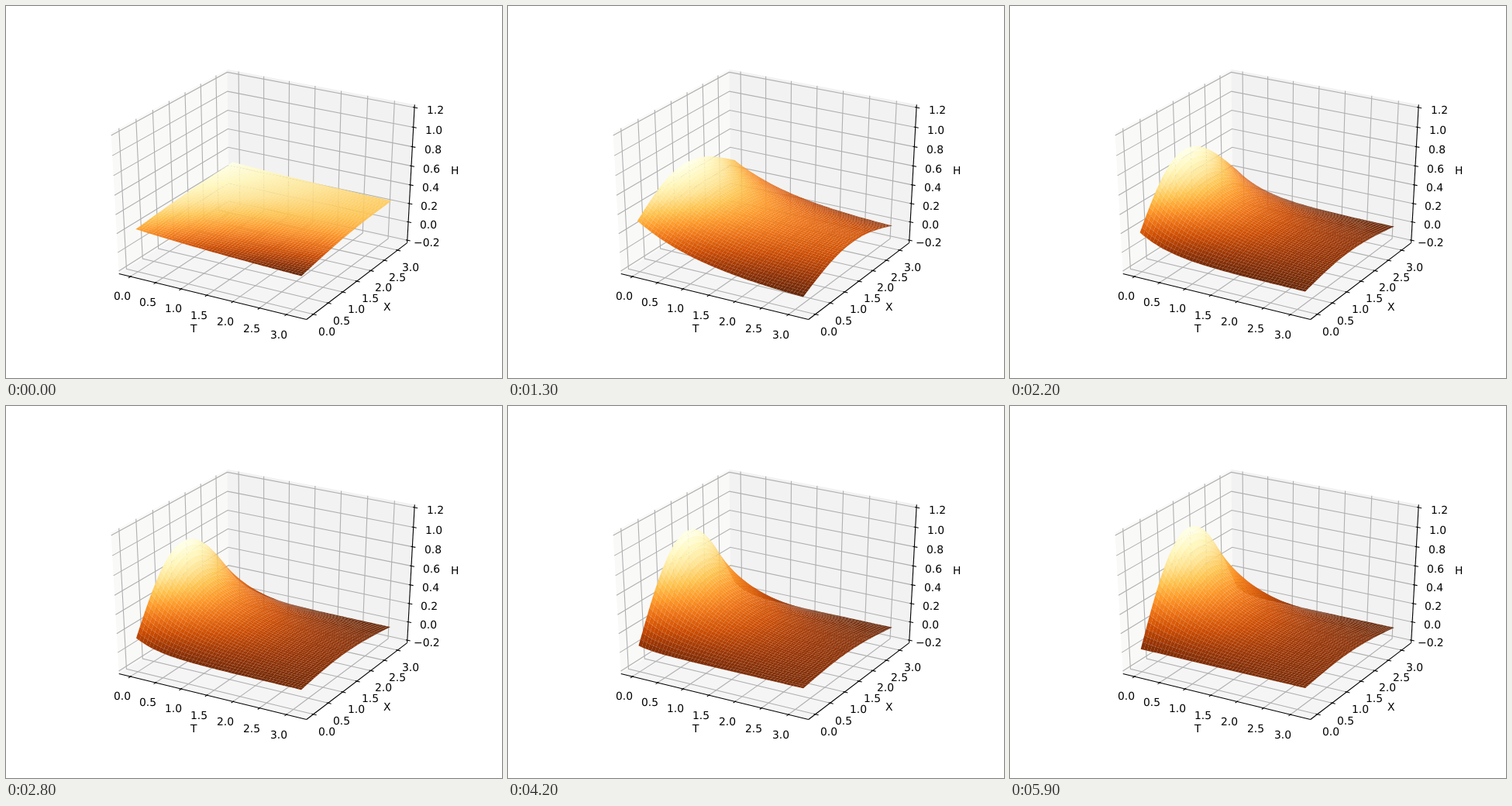
An HTML page with a canvas for the animation above (6 s loop, 640 by 480 pixels).

```html
<!DOCTYPE html>
<html lang="en">
<head>
<meta charset="utf-8">
<title>Surface plot</title>
<style>
html, body { margin: 0; width: 100%; height: 100%; overflow: hidden; background: #fff; }
canvas { display: block; width: 640px; height: 480px; }
</style>
</head>
<body>
<canvas id="stage" width="640" height="480"></canvas>
<script>
const stage = document.getElementById('stage');
const CELLS = 50, LOOP = 6000, STEP = 100, WARMUP = 0.8;
const EDGE = 0.5 + 1 / 48;        // panes reach a little past the axis limits
const TICK_PAD = 0.0738, NAME_PAD = 0.1605;
const RAMP = ['662506', '993404', 'cc4c02', 'ec7014', 'fe9929', 'fec44f', 'fee391', 'fff7bc', 'ffffe5']
  .map(hex => [0, 2, 4].map(i => parseInt(hex.slice(i, i + 2), 16)));

const { PI, exp, sin, min, max, floor, round } = Math;
const lerp = (a, b, k) => a + (b - a) * k;
const spanAxis = v => (v + 0.05 * PI) / (1.1 * PI) - 0.5;
const heightAxis = h => (h + 0.2) / 1.4 - 0.5;

// Perspective view from azimuth -60, elevation 30, distance 10.
function project([x, y, z]) {
  const s = Math.sqrt(3) / 2;
  const depth = 10 - (s / 2 * x - 0.75 * y + z / 2);
  return [334.7 + 2681.1 * (s * x + y / 2) / depth,
          237.4 - 1997.8 * (-x / 4 + s / 2 * y + s * z) / depth];
}

function trace(ctx, points) {
  ctx.beginPath();
  points.forEach(p => ctx.lineTo(...project(p)));
}

function line(ctx, color, ...points) {
  trace(ctx, points);
  ctx.strokeStyle = color;
  ctx.stroke();
}

function fill(ctx, color, ...points) {
  trace(ctx, points);
  ctx.closePath();
  ctx.fillStyle = color;
  ctx.fill();
}

function label(ctx, text, point, drop) {
  const [x, y] = project(point);
  const left = round(x - ctx.measureText(text).width / 2);
  ctx.fillStyle = '#000';
  ctx.fillText(text, left, round(y + drop));
}

function drawAxes(ctx) {
  const E = EDGE, out = E + 1 / 60, inn = E - 1 / 120;
  const far = E + TICK_PAD, name = E + NAME_PAD;
  const grey = '#b0b0b0', black = '#000';
  const spanTicks = Array.from({ length: 7 }, (_, i) => i / 2);
  const heightTicks = Array.from({ length: 8 }, (_, i) => (i - 1) / 5);
  const format = v => v.toFixed(1).replace('-', '\u2212');

  ctx.fillStyle = '#fff';
  ctx.fillRect(0, 0, 640, 480);
  ctx.lineWidth = 1.11;
  ctx.font = '13.89px "DejaVu Sans", sans-serif';
  ctx.textRendering = 'geometricPrecision';

  fill(ctx, '#f9f9f8', [-E, -E, -E], [-E, E, -E], [-E, E, E], [-E, -E, E]);
  fill(ctx, '#f2f2f2', [-E, E, -E], [E, E, -E], [E, E, E], [-E, E, E]);
  fill(ctx, '#f5f5f5', [-E, -E, -E], [E, -E, -E], [E, E, -E], [-E, E, -E]);

  for (const v of spanTicks) {
    const p = spanAxis(v);
    line(ctx, grey, [p, -E, -E], [p, E, -E], [p, E, E]);
    line(ctx, grey, [E, p, -E], [-E, p, -E], [-E, p, E]);
  }
  for (const v of heightTicks) {
    const p = heightAxis(v);
    line(ctx, grey, [E, E, p], [-E, E, p], [-E, -E, p]);
  }

  line(ctx, black, [-E, -E, -E], [E, -E, -E]);
  line(ctx, black, [E, -E, -E], [E, E, -E]);
  line(ctx, black, [E, E, -E], [E, E, E]);

  for (const v of spanTicks) {
    const p = spanAxis(v);
    line(ctx, black, [p, -out, -E], [p, -inn, -E]);
    line(ctx, black, [out, p, -E], [inn, p, -E]);
    label(ctx, format(v), [p, -far, -far], 10.8);
    label(ctx, format(v), [far, p, -far], 10.8);
  }
  for (const v of heightTicks) {
    const p = heightAxis(v);
    line(ctx, black, [out, E, p], [inn, E, p]);
    label(ctx, format(v), [far, far, p], 10.8);
  }
  label(ctx, 'T', [0, -name, -name], 4);
  label(ctx, 'X', [name, 0, -name], 4);
  label(ctx, 'H', [name, name, 0], 4);
}

// Progress towards the final shape, slower for a larger pace.
const settle = (t, pace) => 1 - exp(-((max(0, t - WARMUP) / pace) ** 1.19));
const pulse = (t, peak, width) => exp(-(((t - peak) / width) ** 2));

// Falls from a at T = 0 to b at T = pi, more sharply for a larger rate.
function fall(T, a, b, rate) {
  const end = exp(-rate * PI);
  return lerp(b, a, (exp(-rate * T) - end) / (1 - end));
}

// A tilted sheet warms up, then settles towards exp(-T) sin(X).
function surfaceAt(t) {
  const warm = 1 - (1 - min(1, t / WARMUP)) ** 2;
  const from = (start, value) => lerp(start, value, warm);
  const done = settle(t, 1.9);
  const edgeRate = max(0.35, t - 0.45), archRate = 0.2 + 0.8 * done;

  const frontNear = from(0.227, lerp(0.385, 0, done));
  const frontFar = from(0.14, lerp(-0.124, 0.015, settle(t, 1.1)));
  const backNear = from(0.306, lerp(0.385, 0, settle(t, 2.3)));
  const backFar = from(0.249, lerp(-0.016, -0.042, done));
  const archNear = from(0.012, lerp(0.135, 0.98, done));
  const archFar = from(0.03, 0.06 + 0.11 * pulse(t, 1.3, 0.7));
  const skew = 0.04 * pulse(t, 2.2, 0.8);

  return (T, X) =>
    lerp(fall(T, frontNear, frontFar, edgeRate), fall(T, backNear, backFar, edgeRate), X / PI) +
    fall(T, archNear, archFar, archRate) * sin(X) +
    skew * exp(-T) * sin(2 * X);
}

function rampColor(k) {
  const s = k * (RAMP.length - 1);
  const i = min(floor(s), RAMP.length - 2);
  return `rgb(${RAMP[i].map((c, n) => round(lerp(c, RAMP[i + 1][n], s - i)))})`;
}

function drawSurface(ctx, seconds) {
  const height = surfaceAt(seconds);
  const node = (i, j) => {
    const T = PI * i / CELLS, X = PI * j / CELLS, h = height(T, X);
    return { h, at: [spanAxis(T), spanAxis(X), heightAxis(h)] };
  };

  // Cells run from the far corner to the near one.
  const cells = [];
  for (let i = 0; i < CELLS; i++) {
    for (let j = CELLS - 1; j >= 0; j--) {
      const corners = [node(i, j), node(i + 1, j), node(i + 1, j + 1), node(i, j + 1)];
      cells.push({ corners, mean: corners.reduce((sum, n) => sum + n.h, 0) / 4 });
    }
  }
  const means = cells.map(c => c.mean);
  const low = min(...means), high = max(...means);
  for (const { corners, mean } of cells) {
    fill(ctx, rampColor((mean - low) / (high - low)), ...corners.map(n => n.at));
  }
}

const ctx = stage.getContext('2d');
const backdrop = document.createElement('canvas');
backdrop.width = 640;
backdrop.height = 480;
drawAxes(backdrop.getContext('2d'));

const began = performance.now();
let shown = -1;
function tick() {
  const elapsed = (performance.now() - began) % LOOP;
  const time = floor(elapsed / STEP) * STEP;
  if (time !== shown) {
    shown = time;
    ctx.drawImage(backdrop, 0, 0);
    drawSurface(ctx, time / 1000);
  }
  requestAnimationFrame(tick);
}
tick();
</script>
</body>
</html>
```
